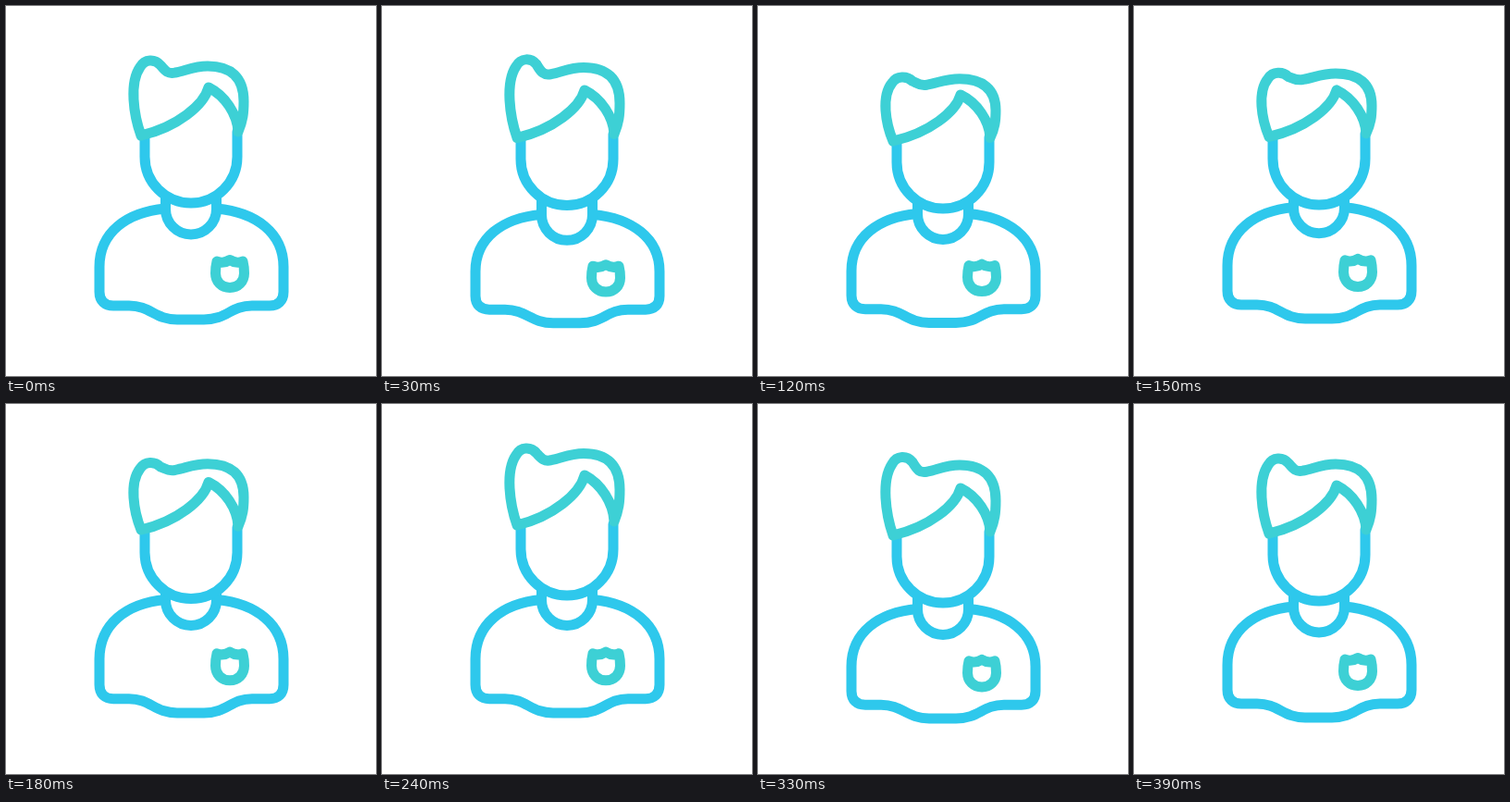
These frames come from a looping animation (400x400 px, 0.42 s). An HTML page:

```html
<!DOCTYPE html>
<html>
<head>
<meta charset="utf-8">
<style>
  html, body { margin: 0; width: 100%; height: 100%; overflow: hidden; background: #fff; }
  svg { display: block; width: 100%; height: 100%; }
  path { fill: none; stroke: #2ec8ec; stroke-width: 11; stroke-linecap: round; stroke-linejoin: round; }
  .teal { stroke: #3dd0d5; }
</style>
</head>
<body>
<svg viewBox="0 0 400 400">
  <path id="body"/>
  <path id="collar"/>
  <path id="badge" class="teal"/>
  <path id="head"/>
  <path id="hair" class="teal"/>
</svg>
<script>
const PERIOD = 420, STEP = 30;
const times = [0, 60, 120, 180, 240, 330, 390];

// Vertical offsets of each part at the times above
const tracks = {
  bottom:   [0, 7, 3.5, -5, -5, 1, 0],
  shoulder: [0, 11.5, 5.5, -7.5, -7.5, 2.5, 0],
  chin:     [0, 5, 6, -2.5, -6, 2, 0],
  fringe:   [0, 5, 6, -4, -9, 2, 0],
  parting:  [0, 6, 8, -3.5, -11, 3, 0],
  crown:    [0, 4, 13.5, -0.5, -11.5, 1, 0],
  tuft:     [0, 0, 18, 4.5, -11, -1.5, 0]
};

// Smooth periodic curve through the keys
function sample(values, t) {
  const n = times.length;
  const time = i => times[(i + n) % n] + PERIOD * Math.floor(i / n);
  const value = i => values[(i + n) % n];
  const slope = i => (value(i + 1) - value(i - 1)) / (time(i + 1) - time(i - 1));
  let i = n - 1;
  while (times[i] > t) i--;
  const h = time(i + 1) - time(i), u = (t - time(i)) / h, v = 1 - u;
  return v * v * (1 + 2 * u) * value(i) + u * u * (3 - 2 * u) * value(i + 1)
    + h * u * v * (v * slope(i) - u * slope(i + 1));
}

// Moves every y of a path, blending two offsets between two heights
function warp(path, y0, d0, y1, d1) {
  return path.replace(/,(\d+(\.\d+)?)/g, (_, y) =>
    "," + (+y + d0 + (d1 - d0) * (y - y0) / (y1 - y0)).toFixed(2));
}

const set = (id, d) => document.getElementById(id).setAttribute("d", d);

function draw(t) {
  const o = {};
  for (const name in tracks) o[name] = sample(tracks[name], t);
  const torso = path => warp(path, 219, o.shoulder, 339, o.bottom);

  set("body", torso(
    "M172,219 C130,223 101,245 101,282 L101,309 C101,319 107,324 116,324 L133,324" +
    " C156,324 161,339 185,339 L214,339 C239,339 243,324 266,324 L285,324" +
    " C294,324 300,319 300,309 L300,282 C300,245 270,223 228,219"));
  set("badge", torso(
    "M228,276 C227,280 226.5,284 226.5,289 C226.5,298 233,304.5 242,304.5" +
    " C251,304.5 257.5,298 257.5,289 C257.5,284 257,280 256,276" +
    " Q249,279 242,274.5 Q235,279 228,276Z"));

  const neck = 206 + o.chin, collar = 219.5 + o.shoulder;
  set("collar", `M172.5 ${neck} V${collar} A27.5 27.5 0 0 0 227.5 ${collar} V${neck}`);

  const jaw = 163 + o.chin;
  set("head", `M150 ${140 + o.chin} V${jaw} A50 50 0 0 0 250 ${jaw} V${136 + o.chin}`);

  set("hair",
    warp("M146,140 C138,118 133,83 145,66 C150,57 161,57 167,64", 59, o.tuft, 140, o.fringe) +
    warp(" C172,70 175,74 183,72 C194,70 203,65 218,65 C243,65 257,77 257,103" +
      " C257,116 256,124 251,136", 68, o.crown, 140, o.fringe) +
    warp(" C250,117 237,97 219,88 C214,107 185,131 146,140Z", 88, o.parting, 140, o.fringe));
}

function tick() {
  const t = performance.now() % PERIOD;
  draw(Math.floor(t / STEP) * STEP);
  requestAnimationFrame(tick);
}
tick();
</script>
</body>
</html>
```
